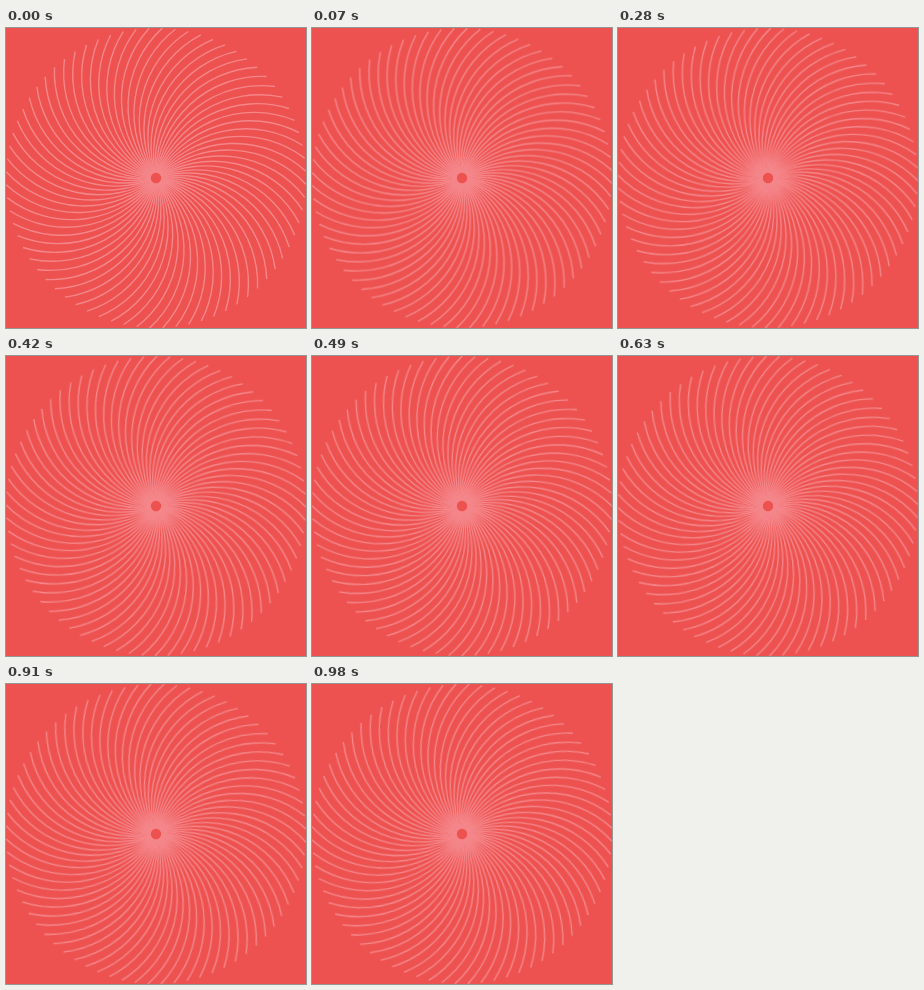
Write an HTML page that moves like this. It is 300 by 300 pixels and loops after 1050 ms.

```html
<!DOCTYPE html>
<html lang="en">
<head>
<meta charset="utf-8">
<title>Spiral</title>
<style>
  html, body { margin: 0; width: 100%; height: 100%; overflow: hidden; background: #ed5250; }
  svg { display: block; width: 100vw; height: 100vh; }
  #arms { fill: none; stroke: #f4868a; stroke-width: 1.4; }
</style>
</head>
<body>
<svg viewBox="-150 -150 300 300">
  <g id="arms"></g>
  <circle r="5.2" fill="#ed5250"/>
</svg>
<script>
  const ARMS = 72, GAP = 360 / ARMS, PHASE = 2.4;
  const REACH = 150, BEND = REACH / Math.SQRT2;
  const LOOP = 1050, STEPS = 15;

  const arms = document.getElementById('arms');
  for (let i = 0; i < ARMS; i++) {
    const arm = document.createElementNS('http://www.w3.org/2000/svg', 'path');
    // a quarter circle from the centre out to the rim
    arm.setAttribute('d', `M0 0A${BEND} ${BEND} 0 0 1 0 ${-REACH}`);
    arm.setAttribute('transform', `rotate(${PHASE + i * GAP})`);
    arms.append(arm);
  }

  // turning by one gap brings the pattern back onto itself
  arms.animate(
    [{ transform: 'rotate(0deg)' }, { transform: `rotate(${-GAP}deg)` }],
    { duration: LOOP, iterations: Infinity, easing: `steps(${STEPS}, end)` }
  );
</script>
</body>
</html>
```
